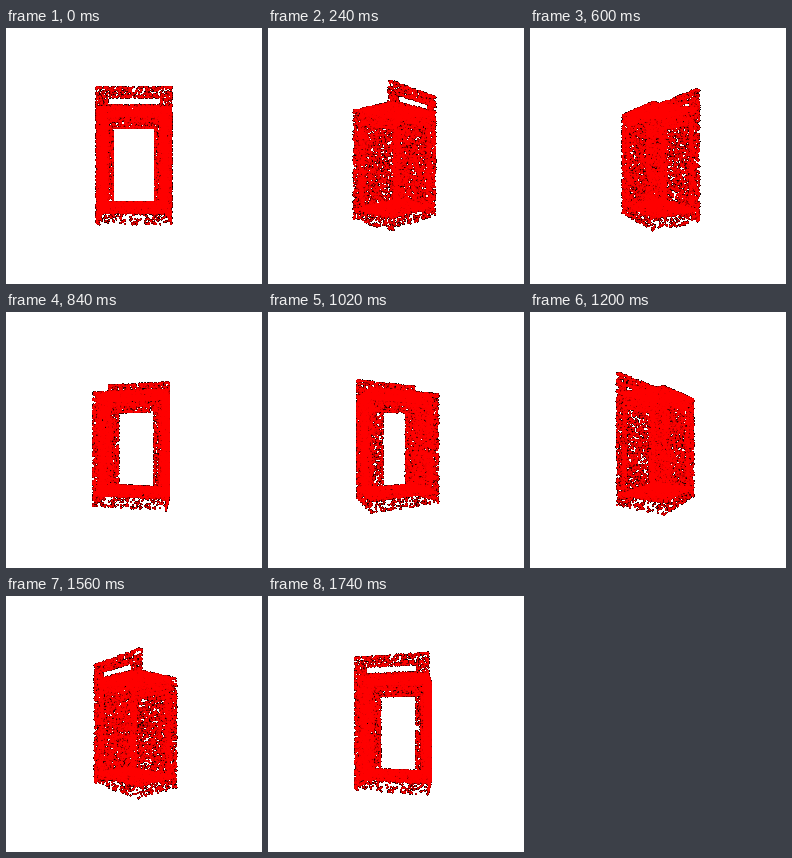
These frames come from a looping animation (256x256 px, 1.8 s). An HTML page with a canvas:

```html
<!DOCTYPE html>
<html lang="en">
<head>
<meta charset="utf-8">
<title>Rotating point cloud</title>
<style>
html, body { margin: 0; width: 100%; height: 100%; overflow: hidden; background: #fff; }
canvas { display: block; width: 256px; height: 256px; }
</style>
</head>
<body>
<canvas id="stage" width="256" height="256"></canvas>
<script>
const SIZE = 256, STEP = 60, STEPS = 30;
const CAMERA = 221.7, RADIUS = 1.28;
// Half width, half depth, wall thickness and levels of the box, in pixels at the axis.
const W = 33.5, D = 24.9, WALL = 3.8;
const BOTTOM = -61, FLOOR = -51, TOP = 44, HANDLE = 61.5;
const WINDOW = [-23.2, 23.2, FLOOR, 31], SLOT = [-24, 24, 45.5, 52.7];
const DENSITY = 0.24;

const ctx = document.getElementById('stage').getContext('2d');
const image = ctx.createImageData(SIZE, SIZE);
const pixels = new Uint32Array(image.data.buffer);
const gap = new Float32Array(SIZE * SIZE);
const points = [];

let seed = 20417;
function random() {
  seed = (seed + 0x6D2B79F5) | 0;
  let t = Math.imul(seed ^ (seed >>> 15), 1 | seed);
  t = (t + Math.imul(t ^ (t >>> 7), 61 | t)) ^ t;
  return ((t ^ (t >>> 14)) >>> 0) / 4294967296;
}

// Scatter points over a rectangle, leaving out an optional hole.
function scatter([u0, u1, v0, v1], place, hole, density = DENSITY) {
  const count = Math.round((u1 - u0) * (v1 - v0) * density);
  for (let i = 0; i < count; i++) {
    const u = u0 + (u1 - u0) * random();
    const v = v0 + (v1 - v0) * random();
    if (hole && u > hole[0] && u < hole[1] && v > hole[2] && v < hole[3]) continue;
    points.push(place(u, v));
  }
}

// Edges of a rectangle in x and y, as deep as a wall.
function rim([x0, x1, y0, y1], z0) {
  const z1 = z0 + WALL;
  for (const x of [x0, x1]) scatter([y0, y1, z0, z1], (y, z) => [x, y, z]);
  for (const y of [y0, y1]) scatter([x0, x1, z0, z1], (x, z) => [x, y, z]);
}

for (const side of [-1, 1]) {
  // The inner shell is inset and ends at the floor.
  for (const [inset, base] of [[0, BOTTOM], [WALL, FLOOR]]) {
    const w = W - inset, d = D - inset;
    scatter([-w, w, base, TOP], (x, y) => [x, y, side * d], WINDOW);
    scatter([-d, d, base, TOP], (z, y) => [side * w, y, z]);
  }
}
rim(WINDOW, -D);
rim(WINDOW, D - WALL);

for (const z of [D, D - WALL]) {
  scatter([-W, W, TOP, HANDLE], (x, y) => [x, y, z], SLOT);
}
rim([-W, W, TOP, HANDLE], D - WALL);
rim(SLOT, D - WALL);

for (const level of [TOP, FLOOR]) {
  scatter([-W, W, -D, D], (x, z) => [x, level, z], null, 0.34);
}

// Each point is a soft disc; discs add up to full red.
function splat(px, py) {
  const x0 = Math.ceil(px - RADIUS - 0.5), x1 = Math.floor(px + RADIUS - 0.5);
  const y0 = Math.ceil(py - RADIUS - 0.5), y1 = Math.floor(py + RADIUS - 0.5);
  for (let y = y0; y <= y1; y++) {
    for (let x = x0; x <= x1; x++) {
      const dx = x + 0.5 - px, dy = y + 0.5 - py;
      const d = (dx * dx + dy * dy) / (RADIUS * RADIUS);
      if (d >= 1) continue;
      const i = y * SIZE + x;
      gap[i] = (gap[i] < 0 ? 1 : gap[i]) * d;
    }
  }
}

function draw(step) {
  const angle = step / STEPS * 2 * Math.PI;
  const c = Math.cos(angle), s = Math.sin(angle);
  gap.fill(-1);
  for (const [x, y, z] of points) {
    const scale = CAMERA / (CAMERA + x * s - z * c);
    splat(128 + (x * c + z * s) * scale, 128 - y * scale);
  }
  for (let i = 0; i < gap.length; i++) {
    pixels[i] = gap[i] < 0 ? 0xffffffff : (0xff000000 | Math.round(255 * (1 - gap[i]))) >>> 0;
  }
  ctx.putImageData(image, 0, 0);
}

const start = performance.now();
let shown = -1;
function tick() {
  const step = Math.floor((performance.now() - start) / STEP) % STEPS;
  if (step !== shown) draw(shown = step);
  requestAnimationFrame(tick);
}
tick();
</script>
</body>
</html>
```
